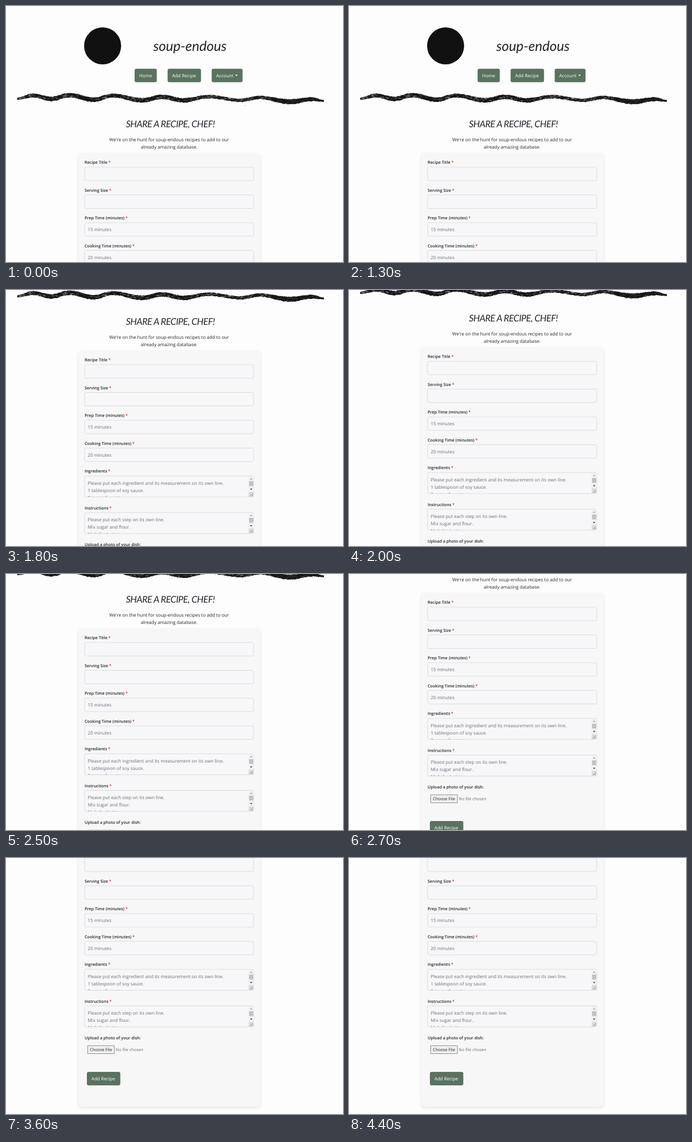
An HTML page that plays this animation: 600x456 px, repeating every 5 s.

```html
<!DOCTYPE html>
<html lang="en">
<head>
<meta charset="utf-8">
<title>Share a recipe</title>
<style>
  html, body { margin: 0; width: 100%; height: 100%; overflow: hidden; background: #fdfdfe; }
  svg { display: block; width: 600px; height: 456px; }
  text { font: 8.15px "Open Sans", "Noto Sans", sans-serif; fill: #212529; text-rendering: geometricPrecision; }
  .brand { font: italic 24.6px Lato, sans-serif; fill: #212529; }
  .heading { font: italic 16.5px Lato, sans-serif; letter-spacing: -.5px; fill: #212529; }
  .mid { text-anchor: middle; }
  .label { font-size: 7.3px; font-weight: 600; }
  .star { fill: #e0202e; }
  .hint { fill: #6c7075; }
  .small { font-size: 7.45px; }
  .light { fill: #fff; }
  .btn { fill: #5a735f; }
  .field { fill: #f7f6f8; stroke: #d6d7da; stroke-width: .8; }
  .card { fill: #f7f7f8; filter: drop-shadow(0 2px 2.5px rgba(0, 0, 0, .09)); }
  #page { animation: scroll 5s step-end infinite; }
  @keyframes scroll {
    0%   { transform: translateY(0); }
    28%  { transform: translateY(-35px); }
    30%  { transform: translateY(-90px); }
    32%  { transform: translateY(-125px); }
    34%  { transform: translateY(-145px); }
    36%  { transform: translateY(-154px); }
    38%  { transform: translateY(-158px); }
    40%  { transform: translateY(-160px); }
    50%  { transform: translateY(-165px); }
    52%  { transform: translateY(-194px); }
    54%  { transform: translateY(-228px); }
    56%  { transform: translateY(-250px); }
    58%  { transform: translateY(-263px); }
    60%  { transform: translateY(-269px); }
    62%  { transform: translateY(-272px); }
    64%  { transform: translateY(-274px); }
    66%  { transform: translateY(-280px); }
    68%  { transform: translateY(-284px); }
    70%  { transform: translateY(-286px); }
    72%, 100% { transform: translateY(-287px); }
  }
</style>
</head>
<body>
<svg viewBox="0 0 600 456">
  <g id="page">
    <circle cx="172" cy="71" r="33" fill="#111"/>
    <text class="brand mid" x="327.5" y="80">soup-endous</text>
    <g id="nav"></g>
    <g id="brush"></g>
    <text class="heading mid" x="292.5" y="215.5">SHARE A RECIPE, CHEF!</text>
    <text class="mid" x="290.5" y="240.7">We're on the hunt for soup-endous recipes to add to our</text>
    <text class="mid" x="290.5" y="253.7">already amazing database.</text>
    <rect class="card" x="128.5" y="262" width="325" height="468" rx="6"/>
    <g id="form"></g>
  </g>
</svg>
<script>
  const put = (id, markup) => { document.getElementById(id).innerHTML = markup; };
  const rect = (cls, x, y, w, h, rx = 2.5) =>
    `<rect class="${cls}" x="${x}" y="${y}" width="${w}" height="${h}" rx="${rx}"/>`;
  const text = (cls, x, y, s) => `<text class="${cls}" x="${x}" y="${y}">${s}</text>`;
  const button = (x, y, w, s) => rect('btn', x, y, w, 24, 3) + text('light', x + 8, y + 15.4, s);
  const label = (y, s) => text('label', 140, y, `${s} <tspan class="star">*</tspan>`);

  const input = (y, name, hint = '') =>
    label(y, name) + rect('field', 140, y + 5.6, 301, 24) + text('hint', 145.5, y + 20.6, hint);

  function textarea(y, name, lines) {
    const top = y + 5.8;
    const rows = lines.map((s, i) => text('hint', 5.5, 15.8 + 13 * i, s)).join('');
    return label(y, name) + rect('field', 140, top, 301, 37.5) +
      `<svg x="140" y="${top}" width="301" height="37.2">${rows}
        <path d="M292 .5h8.7v28h-8.7z" fill="#f1f1f1"/>
        <path d="M294.3 6.3l2.2-2.4 2.2 2.4z" fill="#a0a0a0"/>
        <path d="M292.7 9.5h7.6v8.5h-7.6z" fill="#c1c1c1"/>
        <path d="M294.3 22.6h4.4l-2.2 2.4z" fill="#444"/>
        <path d="M292 28.3h8.7v8.7h-8.7z" fill="#dcdcdc"/>
        <path d="M294.5 35.8l5-5m-2 5l2-2" stroke="#777" stroke-width=".8"/>
      </svg>`;
  }

  put('nav', button(229, 111.7, 39.5, 'Home') + button(287.7, 111.7, 59.5, 'Add Recipe') +
    button(366.2, 111.7, 55, 'Account') + '<path d="M408 122.4h4.8l-2.4 2.5z" fill="#fff"/>');

  put('form',
    input(281.4, 'Recipe Title') + input(330.9, 'Serving Size') +
    input(380.4, 'Prep Time (minutes)', '15 minutes') +
    input(429.9, 'Cooking Time (minutes)', '20 minutes') +
    textarea(479.4, 'Ingredients', ['Please put each ingredient and its measurement on its own line.',
      '1 tablespoon of soy sauce.', '2 cups of yeast.']) +
    textarea(544.6, 'Instructions', ['Please put each step on its own line.',
      'Mix sugar and flour.', 'Melt the butter.']) +
    text('label', 140, 609.6, 'Upload a photo of your dish:') +
    '<path d="M145.4 621.3h47.6v14.2h-47.6z" fill="#efefef" stroke="#777" stroke-width=".8"/>' +
    text('small', 149.2, 631.2, 'Choose File') + text('small hint', 195.3, 631.2, 'No file chosen') +
    button(144, 668, 59.5, 'Add Recipe'));

  // Ink stroke: x, centre y, thickness
  const knots = [
    [20, 165, 3], [48, 159.5, 6], [80, 165.5, 7], [113, 158.8, 7], [156, 167, 7],
    [190, 159.5, 6], [243, 168, 7], [277, 162, 7], [316, 168, 7], [361, 161.5, 5],
    [418, 168, 5], [452, 163, 5], [505, 170.5, 8], [546, 166, 6], [566, 169, 2]
  ];
  let seed = 7;
  const rand = () => (seed = seed * 16807 % 2147483647) / 2147483647;

  function ink(x) {
    const i = Math.max(1, knots.findIndex(k => k[0] >= x));
    const a = knots[i - 1], b = knots[i];
    const t = (1 - Math.cos(Math.PI * (x - a[0]) / (b[0] - a[0]))) / 2;
    return [a[1] + (b[1] - a[1]) * t, a[2] + (b[2] - a[2]) * t];
  }

  const upper = [], lower = [];
  for (let x = 20; x <= 566; x += 1.5) {
    const [y, w] = ink(x);
    upper.push(`${x},${y - w / 2 - rand()}`);
    lower.unshift(`${x},${y + w / 2 + rand()}`);
  }
  let flecks = '';
  for (let n = 0; n < 480; n++) {
    const x = 22 + 535 * rand(), len = 1 + 4 * rand();
    const [y, w] = ink(x), off = (rand() - .5) * w;
    const strength = (x > 470 ? .2 : .55) * rand();
    flecks += `<path d="M${x} ${y + off}L${x + len} ${ink(x + len)[0] + off}" stroke-opacity="${strength}"/>`;
  }
  put('brush', `<polygon points="${upper.concat(lower).join(' ')}" fill="#151516"/>
    <g stroke="#ddd" stroke-width=".9">${flecks}</g>
    <circle cx="426" cy="177.5" r=".6" fill="#777"/>`);
</script>
</body>
</html>
```
